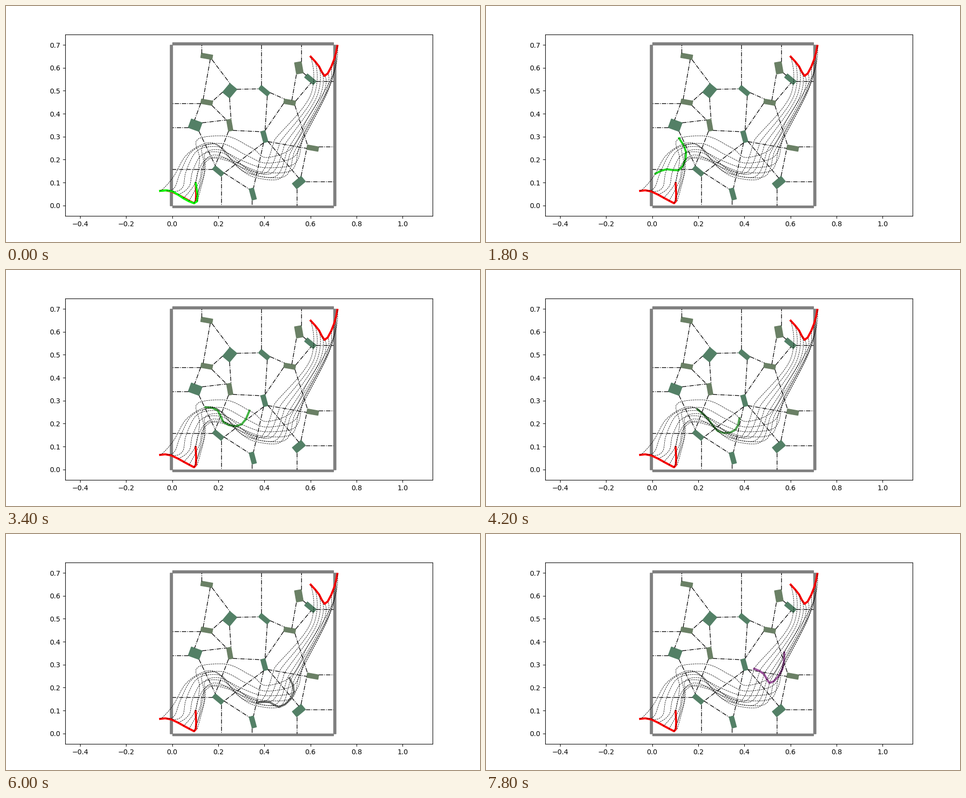
Recreate the animation shown at these times as a matplotlib script. Size 960x480 px, loop 8000 ms.

```python
from itertools import combinations

import numpy as np
import matplotlib.pyplot as plt
from matplotlib.animation import FuncAnimation

SCALE = 466.67          # pixels per data unit
ORIGIN = 336.4, 405.7   # pixel position of (0, 0)
FRAMES, INTERVAL = 40, 200
SIDE = 0.7              # inner size of the room
SAGE, MOSS = "#538066", "#6a8065"

# centre x, centre y, thickness, angle; every block is 0.05 long
BLOCKS = [
    (0.15, 0.65, 0.02, -10), (0.25, 0.50, 0.04, 50), (0.40, 0.50, 0.02, -40),
    (0.51, 0.45, 0.02, -10), (0.15, 0.45, 0.02, -10), (0.10, 0.35, 0.04, -20),
    (0.25, 0.35, 0.02, 100), (0.40, 0.30, 0.02, 105), (0.20, 0.15, 0.02, -40),
    (0.35, 0.05, 0.02, 105), (0.55, 0.10, 0.03, 40), (0.61, 0.25, 0.02, -10),
    (0.55, 0.60, 0.03, 100), (0.60, 0.55, 0.02, -40),
]

# key poses by step: pixel places of five of the ten rope nodes
KNOTS = np.array([0, 2, 4, 7, 9])
KEYS = {
    0: (312, 376, 337, 377, 359, 391, 387, 397, 384, 360),
    4: (321, 369, 357, 370, 381, 364, 403, 336, 392, 313),
    9: (343, 341, 366, 332, 390, 334, 405, 297, 391, 269),
    12: (361, 308, 383, 298, 403, 313, 429, 292, 440, 264),
    17: (404, 279, 429, 286, 440, 309, 477, 314, 493, 286),
    25: (455, 304, 474, 327, 502, 348, 533, 329, 531, 308),
    30: (510, 343, 534, 342, 553, 352, 583, 322, 574, 293),
    39: (543, 274, 563, 285, 574, 303, 600, 275, 604, 241),
    54: (619, 175, 631, 180, 643, 178, 657, 160, 664, 135),
    64: (617, 103, 634, 123, 645, 142, 664, 110, 671, 81),
}


def box(x, y, w, h, angle=0):
    """Corners of a rectangle turned about its centre."""
    a = np.radians(angle)
    turn = np.array([[np.cos(a), np.sin(a)], [-np.sin(a), np.cos(a)]])
    corners = np.array([(-1, -1), (1, -1), (1, 1), (-1, 1)]) * (w / 2, h / 2)
    return corners @ turn + (x, y)


def feet(p, shape):
    """Nearest point to p on each edge of a shape."""
    edge = np.roll(shape, -1, axis=0) - shape
    t = ((p - shape) * edge).sum(1) / (edge ** 2).sum(1)
    return shape + np.clip(t, 0, 1)[:, None] * edge


def distance(p, shape):
    return np.hypot(*(feet(p, shape) - p).T).min()


def gap(a, b):
    """Shortest segment between two shapes; ties are averaged."""
    pairs = np.array([(v, f) for v in a for f in feet(v, b)]
                     + [(f, v) for v in b for f in feet(v, a)])
    size = np.hypot(*(pairs[:, 0] - pairs[:, 1]).T)
    return pairs[size < size.min() + 1e-6].mean(axis=0)


def links(shapes, count):
    """Gaps whose surrounding circle holds no third shape."""
    for i, j in combinations(range(len(shapes)), 2):
        if i >= count:
            continue
        seg = gap(shapes[i], shapes[j])
        radius = np.hypot(*(seg[1] - seg[0])) / 2
        others = (s for k, s in enumerate(shapes) if k not in (i, j))
        if all(distance(seg.mean(axis=0), s) > 0.99 * radius for s in others):
            yield seg


def hermite(t, knots, values):
    """Smooth curve through values at uneven knots."""
    slope = np.gradient(values, knots, axis=0, edge_order=2)
    i = np.clip(np.searchsorted(knots, t, side="right") - 1, 0, len(knots) - 2)
    h = knots[i + 1] - knots[i]
    u = (t - knots[i]) / h
    h, u = (a.reshape(-1, *[1] * (values.ndim - 1)) for a in (h, u))
    return ((1 + 2 * u) * (1 - u) ** 2 * values[i]
            + u * (1 - u) ** 2 * h * slope[i]
            + u * u * (3 - 2 * u) * values[i + 1]
            + u * u * (u - 1) * h * slope[i + 1])


nodes = np.arange(10)


def rope_pose(flat):
    points = (np.reshape(flat, (-1, 2)) - ORIGIN) / SCALE * (1, -1)
    return hermite(nodes, KNOTS, points)


poses = {k: rope_pose(v) for k, v in KEYS.items()}
poses[36] = poses[39] + np.array([-1.5, -6]) / SCALE   # slow drift before 39
steps = np.array(sorted(poses))
last = steps[-1]
ropes = hermite(np.arange(last + 1), steps, np.array([poses[s] for s in steps]))

# the resting rope weaves slightly around the first pose
start = ropes[0].copy()
start[:, 0] -= 3 / SCALE * np.sin(np.pi * nodes / 3)

fig = plt.figure(figsize=(9.6, 4.8), dpi=100)
ax = fig.add_subplot()
ax.set_xlim(0.3332 - 372 / SCALE, 0.3332 + 372 / SCALE)
ax.set_ylim(-0.046, 0.746)

blocks = [box(x, y, 0.05, h, angle) for x, y, h, angle in BLOCKS]
walls = [box(x, SIDE / 2, 0.01, SIDE) for x in (-0.005, SIDE + 0.005)]
walls += [box(SIDE / 2, y, SIDE, 0.01) for y in (-0.005, SIDE + 0.005)]

for wall in walls:
    ax.fill(*wall.T, color="gray")
for block, (*_, angle) in zip(blocks, BLOCKS):
    ax.fill(*block.T, color=MOSS if angle in (-10, 100) else SAGE)
for link in links(blocks + walls, len(blocks)):
    ax.plot(*link.T, "k-.", lw=1)
for line in (start, ropes[-1]):
    ax.plot(*line.T, color="red", lw=3)
for node in nodes:
    ax.plot(*ropes[:, node].T, "k--", lw=0.6, zorder=4)

rope, = ax.plot([], [], lw=3, zorder=3)


def update(k):
    rope.set_data(*ropes[k].T)
    rope.set_color((k / last, 1 - 0.0174 * k, k / last))
    return rope,


anim = FuncAnimation(fig, update, frames=FRAMES, interval=INTERVAL,
                     init_func=lambda: update(0), repeat=True, repeat_delay=0)
plt.show()
```
